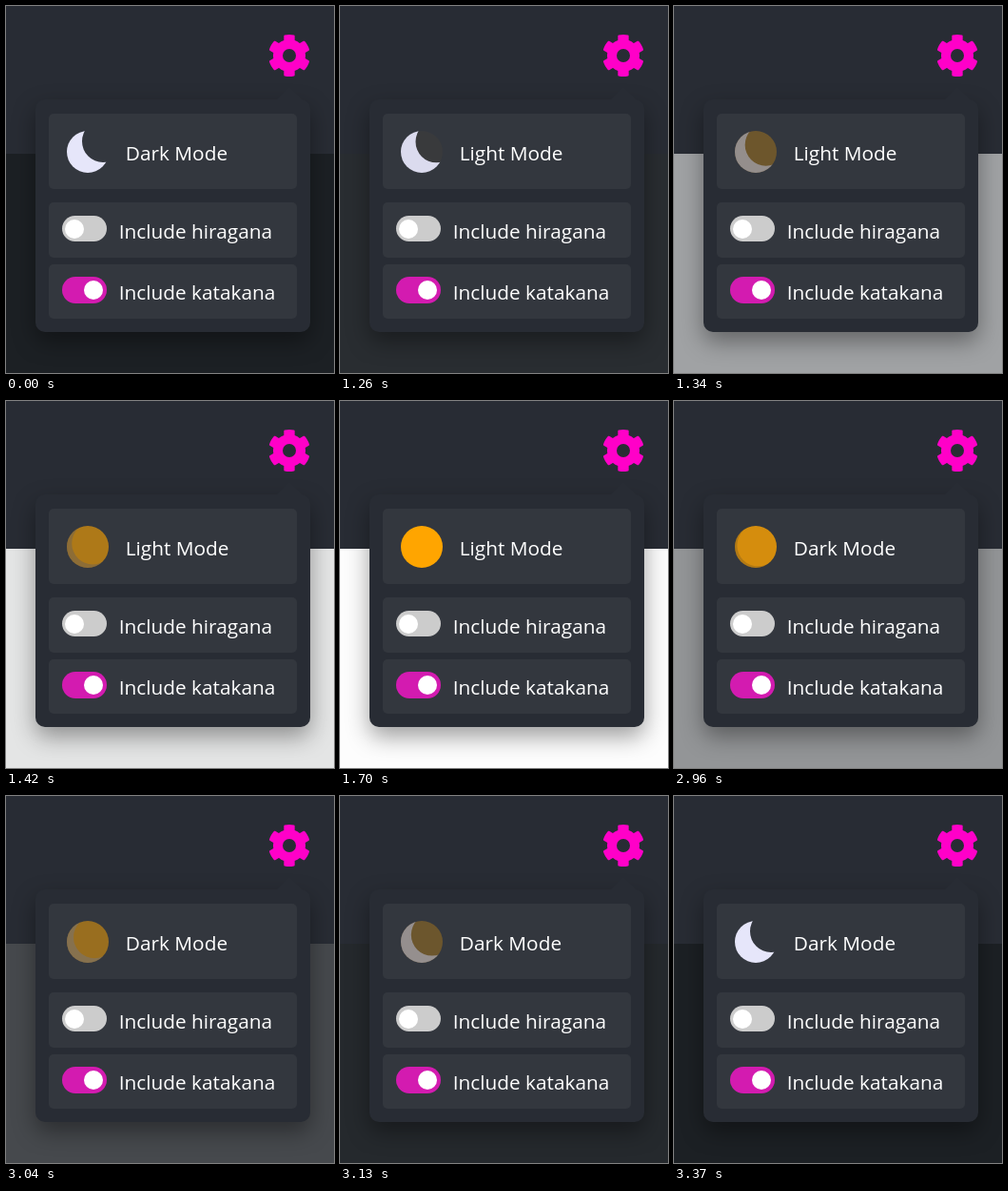
These frames come from a looping animation (345x385 px, 4110 ms). An HTML page:

```html
<!DOCTYPE html>
<html lang="en">
<head>
<meta charset="utf-8">
<title>Settings menu</title>
<style>
  html, body { margin: 0; width: 100%; height: 100%; overflow: hidden; background: #1c2024; }
  #stage { position: absolute; left: 0; top: 0; width: 345px; height: 385px; overflow: hidden; }
  #stage div { position: absolute; box-sizing: border-box; }
  #header { left: 0; top: 0; width: 345px; height: 155px; background: #282c34; }
  #panel {
    left: 31px; top: 98px; width: 289px; height: 244px; border-radius: 10px; background: #282c34;
    box-shadow: 0 10px 24px rgba(0,0,0,.38);
  }
  .card { left: 45px; width: 261px; border-radius: 5px; background: #33373e; }
  .switch { left: 59px; width: 47px; height: 27px; border-radius: 14px; background: #ccc; }
  .switch::after {
    content: ""; position: absolute; left: 3px; top: 3.5px;
    width: 20px; height: 20px; border-radius: 50%; background: #fff;
  }
  .switch.on { height: 28px; background: #d31bb0; }
  .switch.on::after { left: 22.5px; top: 4px; }
  #icon { left: 64px; top: 131px; width: 44px; height: 44px; border-radius: 50%; }
  svg { position: absolute; left: 0; top: 0; }
  text { font: 20.8px "Open Sans", "Noto Sans", sans-serif; fill: #fff; }
</style>
</head>
<body>
<div id="stage">
  <div id="header"></div>
  <div id="panel"></div>
  <div class="card" style="top:113px;height:79px"></div>
  <div class="card" style="top:206px;height:58px"></div>
  <div class="card" style="top:271px;height:57px"></div>
  <div class="switch" style="top:220px"></div>
  <div class="switch on" style="top:284px"></div>
  <div id="icon"></div>
  <svg width="345" height="385">
    <path d="M284 99L298 85L312 99Z" fill="#282c34"/>
    <g id="gear" transform="translate(298 52) scale(.0887)" fill="#ff00c8"></g>
    <circle cx="298" cy="52" r="7" fill="#282c34"/>
    <text id="mode" x="125.8" y="162">Dark Mode</text>
    <text x="118.8" y="244">Include hiragana</text>
    <text x="118.8" y="308">Include katakana</text>
  </svg>
</div>
<script>
const LOOP = 4110, TO_LIGHT = 1260, TO_DARK = 2880;
const DARK = [28, 32, 36], LIGHT = [253, 253, 253], LAVENDER = [230, 230, 250];
const stage = document.getElementById('stage');
const icon = document.getElementById('icon');
const mode = document.getElementById('mode');

const tooth = 'M0 0L-64-181V-230.2c0-5.6 3.9-10.5 9.4-11.7 34.9-7.8 72.5-8.2 109.2 0' +
  ' 5.5 1.2 9.4 6.1 9.4 11.7V-181C86.3-173.2 106.9-161.3 126-145L130-120Z';
document.getElementById('gear').innerHTML =
  [0, 60, 120, 180, 240, 300].map(a => `<path d="${tooth}" transform="rotate(${a})"/>`).join('');

// CSS "ease": cubic-bezier(.25, .1, .25, 1)
function ease(x) {
  if (x <= 0) return 0;
  if (x >= 1) return 1;
  const bezier = (a, b, u) => 3 * a * u * (1 - u) ** 2 + 3 * b * u * u * (1 - u) + u ** 3;
  let low = 0, high = 1;
  for (let i = 0; i < 24; i++) {
    const mid = (low + high) / 2;
    if (bezier(.25, .25, mid) < x) low = mid; else high = mid;
  }
  return bezier(.1, 1, low);
}

// Milliseconds into a transition, advanced in 40 ms steps
function elapsed(since, length, lead, speed) {
  if (since < 0) return 0;
  return since >= length ? 1000 : lead + speed * Math.floor(since / 40) * 40;
}

function draw(now) {
  const t = now % LOOP;
  const light = elapsed(t - TO_LIGHT, 440, 22, 1);
  const dark = elapsed(t - TO_DARK, 490, 14, .87);
  const progress = duration => ease(light / duration) - ease(dark / duration);

  const day = progress(300);
  stage.style.background = `rgb(${DARK.map((c, i) => c + (LIGHT[i] - c) * day)})`;

  const sun = progress(520), moon = 1 - sun;
  const shift = moon ** 1.2;
  const shade = LAVENDER.map(c => c * moon);
  icon.style.background = `rgba(255,165,0,${sun})`;
  icon.style.boxShadow = `inset ${16 * shift}px ${-11 * shift}px 0 rgba(${shade},${moon})`;

  mode.textContent = t >= TO_LIGHT && t < TO_DARK ? 'Light Mode' : 'Dark Mode';
}

const start = performance.now();
function tick() {
  draw(performance.now() - start);
  requestAnimationFrame(tick);
}
tick();
</script>
</body>
</html>
```
